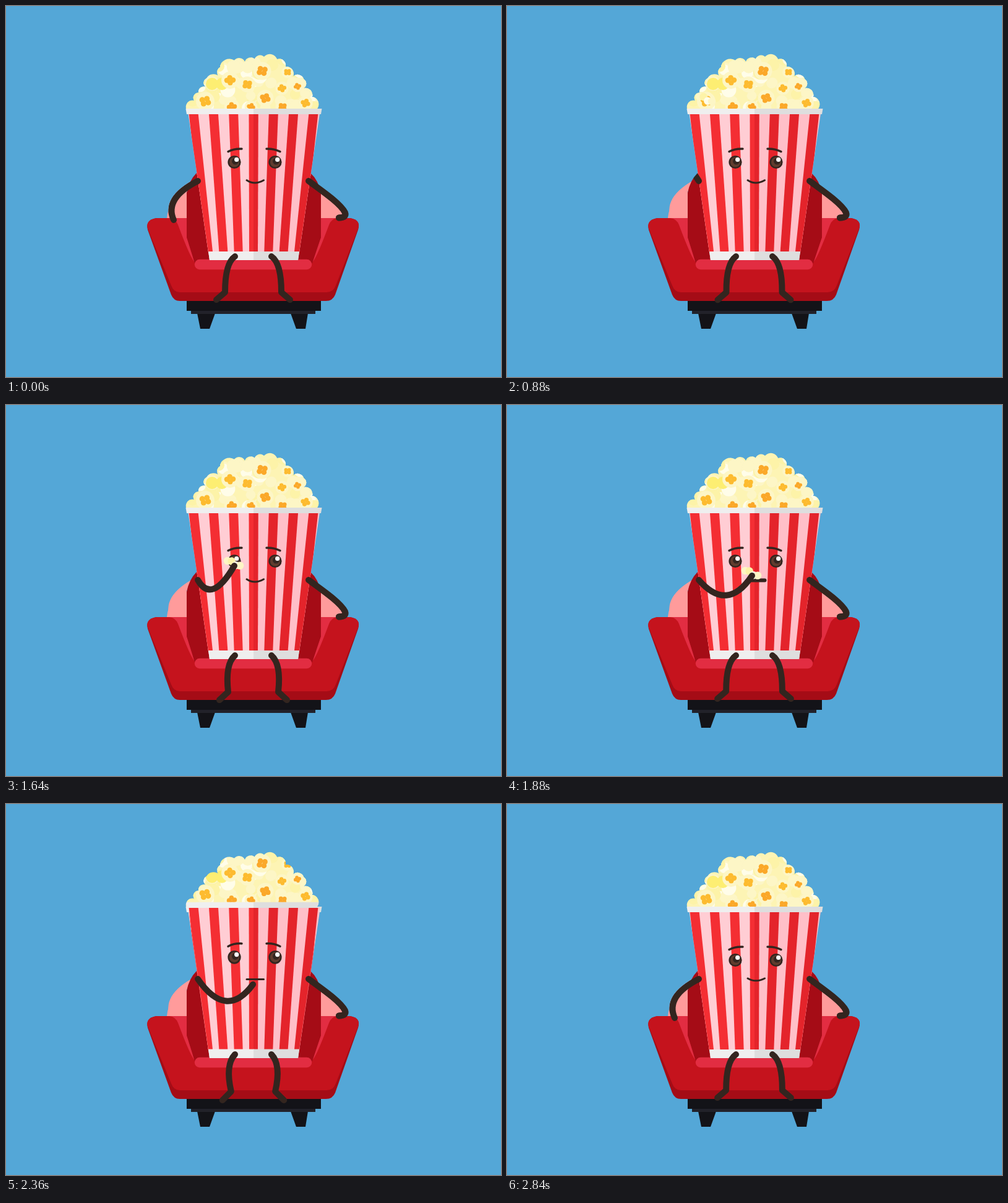
An HTML page with a canvas for the animation above (2880 ms loop, 800 by 600 pixels).

```html
<!DOCTYPE html>
<html lang="en">
<head>
<meta charset="utf-8">
<title>Popcorn break</title>
<style>
  html, body { margin: 0; width: 100%; height: 100%; overflow: hidden; background: #54a7d7; }
  canvas { display: block; width: 800px; height: 600px; }
</style>
</head>
<body>
<canvas id="stage" width="800" height="600"></canvas>
<script>
const ctx = document.getElementById('stage').getContext('2d');
const LOOP = 2880, STEP = 40, FLOOR = 410, CENTER = 400;
const INK = '#33251f', RED = '#c5131d', DEEP = '#a50c16', BRIGHT = '#e22d42', PINK = '#ff9b9b';
const TINTS = ['#fdf6c6', '#fdf3a8', '#fffde9', '#fdf6c6'];

const fill = (color, d) => { ctx.fillStyle = color; ctx.fill(new Path2D(d)); };
const line = (d, width, color = INK) => {
  ctx.strokeStyle = color;
  ctx.lineWidth = width;
  ctx.lineCap = ctx.lineJoin = 'round';
  ctx.stroke(new Path2D(d));
};
const dot = (color, x, y, r) => {
  ctx.fillStyle = color;
  ctx.beginPath();
  ctx.arc(x, y, r, 0, 7);
  ctx.fill();
};
const clipped = (d, paint) => {
  ctx.save();
  ctx.clip(new Path2D(d));
  paint();
  ctx.restore();
};

const mix = (a, b, p) => a + (b - a) * p;
const smooth = p => (1 - Math.cos(Math.PI * p)) / 2;
const progress = (t, from, to) => Math.min(1, Math.max(0, (t - from) / (to - from)));
const bump = (t, from, to) => Math.sin(Math.PI * progress(t, from, to)) ** 2;

// Popcorn: a bumpy outline filled with seeded random puffs
let seed = 11;
const random = () => (seed = seed * 16807 % 2147483647) / 2147483647;

const edge = [[291, 166], [304, 153], [311, 140], [323, 131], [324, 117], [346, 116], [346, 99], [369, 88],
  [386, 90], [402, 86], [417, 82], [438, 86], [452, 98], [464, 114], [481, 118], [481, 133], [495, 147], [503, 166]];
const mound = edge.map(([x, y], i) => {
  if (!i) return `M${x} ${y}`;
  const r = .58 * Math.hypot(x - edge[i - 1][0], y - edge[i - 1][1]);
  return `A${r} ${r} 0 0 1 ${x} ${y}`;
}).join('') + 'Z';

const puffs = Array.from({ length: 70 }, (_, i) => [
  TINTS[i % TINTS.length], mix(292, 502, random()), mix(84, 165, random()), mix(7, 12, random()),
]);
const hearts = [[322, 154], [414, 105], [362, 120], [419, 149], [390, 127], [365, 163],
  [484, 157], [447, 163], [446, 133], [396, 163], [455, 107], [471, 130]];

function popcorn() {
  fill('#fdf4b4', mound);
  clipped(mound, () => {
    puffs.forEach(puff => dot(...puff));
    for (const x of [333, 349]) dot('#fdee72', x, 126, 10);
    hearts.forEach(([x, y], i) => {
      const r = 10 - i * .35, color = i % 2 ? '#fba829' : '#fdbb2f';
      dot(TINTS[0], x, y, r * 1.5);
      for (let k = 0; k < 4; k++) {
        const a = i * .5 + .5 + k * Math.PI / 2;
        dot(color, x + Math.cos(a) * r * .55, y + Math.sin(a) * r * .45, r * .45);
      }
    });
  });
}

function bucket() {
  clipped('M294.5 174H507L474 398H327Z', () => {
    fill('#ffcdd4', 'M290 170H400V400H290Z');
    fill('#ffbfc8', 'M400 170H510V400H400Z');
    for (let k = -3; k <= 3; k++) {
      const top = CENTER + k * 32.3 - 7.5, low = CENTER + k * 24.3 - 7;
      fill(k > 0 ? '#e4242b' : '#f42e33', `M${top} 174h15L${low + 14} 398h-14Z`);
    }
    fill('#e4242b', 'M400 174H407.5L407 398H400Z');
  });
  fill('#efefef', 'M327 397H401V411H329ZM290.5 166H401V175H292Z');
  fill('#dedede', 'M400 397H474L472 411H400ZM400 166H510.5L509 175H400Z');
}

function eyes() {
  for (const x of [369, 435]) {
    dot(INK, x, 252.5, 10.6);
    dot('#603c2e', x, 252.5, 8);
    dot(INK, x + 1.5, 251, 5.5);
    dot('#fff', x + 3.7, 248.4, 3.6);
  }
  line('M359 235.5Q368 230.5 381 231M421 231Q433 230.5 443 235.5', 3.4);
}

function mouth(t) {
  const smile = 1 - progress(t, 1640, 1800) + progress(t, 2640, 2860);
  const open = bump(t, 1720, 2040);
  const y = mix(283.5, 281.8, smile);
  line(`M389 ${y}Q402 ${y + 8.5 * smile} 416.5 ${y}`, 3 + 3 * open);
}

function chair() {
  fill(PINK, 'M302 284Q262 312 260 343H292V290ZM505 290L549 330V343H509Z');
  fill(DEEP, 'M292 380V302Q296 282 308 270H492Q505 282 509 302V380Z');
  fill(DEEP, 'M243 343H556Q574 346 569 362L532 467Q528 477 517 477H281Q271 477 267 467L229 362Q225 346 243 343Z');
  fill(RED, 'M243 343H556Q574 346 569 360L533 452Q529 463 518 463H281Q271 463 267 452L229 360Q225 346 243 343Z');
  fill(BRIGHT, 'M264 343H292V374L306 415Q300 413 278 354Q274 344 264 343ZM535 343H509V374L494 415Q500 413 522 354Q526 344 535 343Z');
  fill(DEEP, 'M292 340H509V374L495 416H305L292 374Z');
  line('M313 418H486', 16.5, BRIGHT);
  fill('#131318', 'M292 477H509V493H292ZM309 497H338L329 522H314ZM460 497H488L484 522H469Z');
  fill('#22222a', 'M299 493H500V498H299Z');
}

function legs(t) {
  const beat = t % 960;
  const swing = smooth(beat < 400 ? beat / 400 : (960 - beat) / 560);
  const knee = 10 * swing;
  for (const side of [1, -1]) {
    const x = v => 399.5 + side * (v - 399.5);
    line(`M${x(370)} 405Q${x(354)} ${mix(416, 422, swing)} ${x(354 + knee)} ${463 + knee * .2}l${-14 * side} ${mix(12, 14, swing)}`, 10);
  }
}

// Left arm poses: elbow handle, then hand
const REST = [255, 311, 271, 346], BOWL = [275, 235, 284, 160], LIFT = [262, 283, 288, 212];
const OFFER = [356, 336, 396, 276], BITE = [362, 351, 405, 283], DROP = [309, 340, 352, 361];
const routine = [
  [0, REST], [600, BOWL], [1000, BOWL, p => p * p], [1400, LIFT, p => p * (2 - p)], [1880, OFFER],
  [2160, BITE], [2280, BITE, p => p * p], [2520, DROP, p => p * (2 - p)], [2760, REST], [LOOP, REST],
];

const armPath = ([ex, ey, x, y]) => `M310 283Q${ex} ${ey} ${x} ${y}`;
const rightArm = () => line('M489 283C515 302 541 320 548 334Q551 342 538 342.5', 10);

function leftArm(t) {
  const next = routine.findIndex(key => key[0] > t);
  const [from, pose, ease = smooth] = routine[next - 1];
  const [to, target] = routine[next];
  const p = ease(progress(t, from, to));
  const now = pose.map((v, i) => mix(v, target[i], p));
  const [, , x, y] = now;
  if (t >= 600 && t < 2000) {
    const inward = Math.max(0, 212 - y) * .73;
    for (let i = 0; i < 4; i++) {
      dot(TINTS[i], x + inward - 11 + i * 6.7, y - inward * .15 - 8 + i * 3.6 - i % 2 * 3, 6.3);
    }
  }
  line(armPath(now), 10);
}

function draw(t) {
  ctx.globalCompositeOperation = 'source-over';
  ctx.clearRect(0, 0, 800, 600);
  line(armPath(REST), 10, PINK);
  chair();
  popcorn();
  bucket();
  rightArm();

  // Moving parts show only inside the resting outline
  ctx.globalCompositeOperation = 'source-atop';
  ctx.save();
  ctx.translate(0, FLOOR);
  ctx.scale(1, 1 + bump(t, 2000, 2820) * .031);
  ctx.translate(0, -FLOOR);
  popcorn();
  bucket();
  eyes();
  ctx.restore();
  mouth(t);
  rightArm();
  legs(t);
  leftArm(t);
}

const start = performance.now();
function tick() {
  const t = (performance.now() - start) % LOOP;
  draw(Math.floor(t / STEP) * STEP);
  requestAnimationFrame(tick);
}
tick();
</script>
</body>
</html>
```
